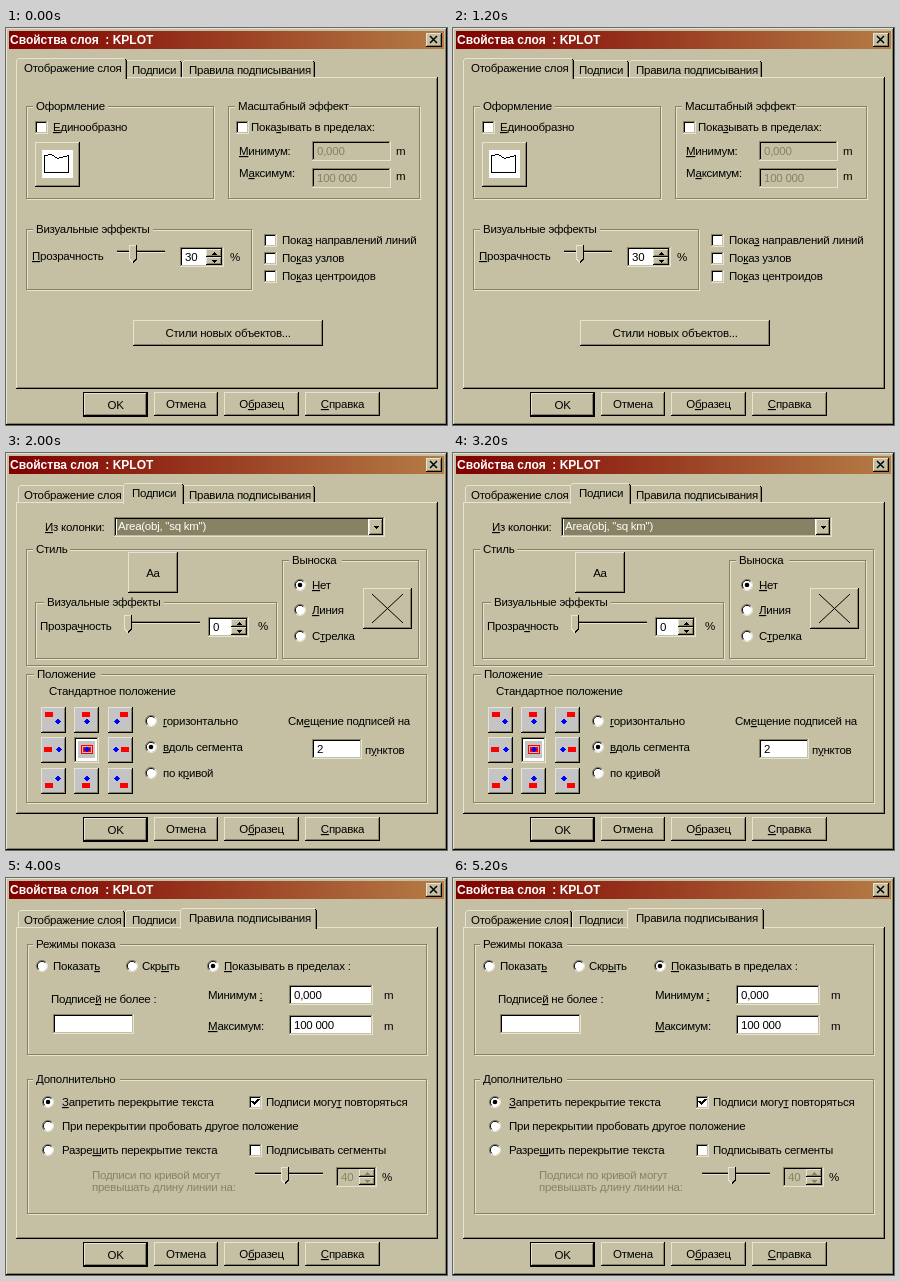
These frames come from a looping animation (441 by 397 pixels, 6000 ms). An HTML page:

```html
<!DOCTYPE html>
<html lang="ru">
<head>
<meta charset="utf-8">
<title>Свойства слоя</title>
<style>
html, body { margin: 0; width: 100%; height: 100%; overflow: hidden; background: #c5c0a4; }
svg { display: block; }
text { font: 11.5px "Liberation Sans", Arial, sans-serif; letter-spacing: -.25px; white-space: pre; }
.u { text-decoration: underline; }
.title { font-size: 12px; font-weight: bold; letter-spacing: 0; }
</style>
</head>
<body>
<svg id="stage" width="441" height="397" viewBox="0 0 441 397" shape-rendering="crispEdges"></svg>
<script>
const FACE = '#c5c0a4', LIGHT = '#e6e3d2', DARK = '#878263', INK = '#000', WHITE = '#fff';
const RED = '#f00', BLUE = '#00f', GREY = '#c4c4c4';

const rect = (x, y, w, h, c) => `<rect x="${x}" y="${y}" width="${w}" height="${h}" fill="${c}"/>`;
const path = (d, stroke = INK, fill = 'none', w = 1) =>
  `<path d="${d}" stroke="${stroke}" fill="${fill}" stroke-width="${w}"/>`;
const smooth = s => `<g shape-rendering="auto">${s}</g>`;

// y is the middle of the line; "&" underlines the next letter
function text(x, y, s, o = {}) {
  const body = s.replace(/&(.)/g, '<tspan class="u">$1</tspan>');
  return `<text x="${x}" y="${y + 4}" fill="${o.c || INK}" text-anchor="${o.mid ? 'middle' : 'start'}" class="${o.cls || ''}">${body}</text>`;
}
const dimText = (x, y, s) => text(x, y, s, { c: DARK });

// Two-tone one pixel frame
const edge = (x, y, w, h, a, b) =>
  rect(x, y, w, 1, a) + rect(x, y, 1, h, a) + rect(x, y + h - 1, w, 1, b) + rect(x + w - 1, y, 1, h, b);
const raised = (x, y, w, h, fill = FACE) =>
  rect(x, y, w, h, fill) + edge(x, y, w, h, LIGHT, INK) + edge(x + 1, y + 1, w - 2, h - 2, fill, DARK);
const sunken = (x, y, w, h, fill = WHITE) =>
  rect(x, y, w, h, fill) + edge(x, y, w, h, DARK, LIGHT) + edge(x + 1, y + 1, w - 2, h - 2, INK, FACE);

function button(x, y, w, h, s, main) {
  const frame = main ? rect(x, y, w, h, INK) + raised(x + 1, y + 1, w - 2, h - 2) : raised(x, y, w, h);
  return frame + text(x + w / 2, y + h / 2, s, { mid: true });
}

function group(x, y, x2, y2, s, lx, labelW) {
  const w = x2 - x, h = y2 - y;
  return edge(x + 1, y + 1, w, h, LIGHT, LIGHT) + edge(x, y, w, h, DARK, DARK) +
    rect(lx - 3, y - 1, labelW + 6, 4, FACE) + text(lx, y, s);
}

function check(x, y, s, tx, on) {
  return sunken(x, y - 6, 13, 13) +
    (on ? path(`M${x + 3} ${y - 1}l2.5 3l4.5 -5`, INK, 'none', 2) : '') + text(tx, y, s);
}

function radio(x, y, s, tx, on) {
  return smooth(`<circle cx="${x}" cy="${y}" r="5" fill="#fff"/>` +
    path(`M${x - 4} ${y + 4}A5.6 5.6 0 0 1 ${x + 4} ${y - 4}`, DARK) +
    path(`M${x - 3.3} ${y + 3.3}A4.6 4.6 0 0 1 ${x + 3.3} ${y - 3.3}`) +
    path(`M${x - 4} ${y + 4}A5.6 5.6 0 0 0 ${x + 4} ${y - 4}`, LIGHT) +
    (on ? `<circle cx="${x}" cy="${y}" r="2.3"/>` : '')) + text(tx, y, s);
}

function field(x, y, w, h, s, off) {
  return sunken(x, y, w, h, off ? FACE : WHITE) + (off ? dimText : text)(x + 5, y + h / 2, s);
}

function spinner(x, y, w, h, s, off) {
  const bx = x + w - 18, cx = bx + 8, half = (h - 4) / 2, my = y + 2 + half, c = off ? DARK : INK;
  return field(x, y, w, h, s, off) + raised(bx, y + 2, 16, half) + raised(bx, my, 16, half) +
    path(`M${cx - 3} ${y + 8}h6l-3 -3z`, 'none', c) + path(`M${cx - 3} ${my + 3}h6l-3 3z`, 'none', c);
}

function slider(x, x2, y, tx, ty, h) {
  return rect(x, y, x2 - x, 1, DARK) + rect(x, y + 1, x2 - x, 1, INK) + rect(x, y + 2, x2 - x, 1, LIGHT) +
    path(`M${tx} ${ty}h8v${h - 4}l-4 4l-4 -4z`, 'none', FACE) +
    path(`M${tx + 4} ${ty + h - .5}l-3.5 -3.5V${ty + .5}h7`, LIGHT) +
    path(`M${tx + 7.5} ${ty}v${h - 4}l-3.5 3.5`);
}

const TABS = [[12, 119, 'Отображение слоя', 18], [119, 176, 'Подписи', 126], [176, 309, 'Правила подписывания', 183]];

function tab(i, on) {
  const [a, b, s, tx] = TABS[i], g = on ? 2 : 0;
  const x = a - g, x2 = b + g, y = 32 - g, bottom = on ? 51 : 49;
  return rect(x + 1, y + 1, x2 - x - 2, bottom - y - 1, FACE) +
    rect(x, y + 2, 1, bottom - y - 2, LIGHT) + rect(x + 1, y + 1, 1, 1, LIGHT) +
    rect(x + 2, y, x2 - x - 4, 1, LIGHT) + rect(x2 - 2, y + 1, 1, 1, INK) +
    rect(x2 - 1, y + 2, 1, bottom - y - 2, INK) + rect(x2 - 2, y + 2, 1, bottom - y - 2, DARK) +
    text(tx, on ? 40 : 42, s);
}

function tabs(active) {
  return TABS.map((_, i) => i === active ? '' : tab(i)).join('') +
    raised(10, 49, 422, 312) + tab(active, true);
}

function shell() {
  return '<defs><linearGradient id="bar"><stop stop-color="#800000"/><stop offset="1" stop-color="#b57c45"/></linearGradient></defs>' +
    raised(0, 0, 441, 397) + rect(3, 3, 435, 18, 'url(#bar)') +
    text(4, 12, 'Свойства слоя  : KPLOT', { c: WHITE, cls: 'title' }) +
    raised(420, 5, 16, 14) + smooth(path('M424 8l7 7M431 8l-7 7', INK, 'none', 1.5)) +
    button(77, 364, 65, 25, 'OK', true) + button(148, 364, 64, 24, 'Отмена') +
    button(218, 364, 75, 24, 'О&бразец') + button(299, 364, 75, 24, '&Справка');
}

function layerPage() {
  return group(20, 78, 208, 171, 'Оформление', 30, 69) +
    check(29, 99, '&Единообразно', 47) + raised(29, 114, 45, 45) + rect(36, 122, 31, 28, WHITE) +
    path('M38.5 127.5l7 -1l6 4l11 -3v17h-24z') +
    group(222, 78, 414, 171, 'Масштабный эффект', 232, 108) +
    check(230, 99, 'Пока&зывать в пределах:', 245) +
    text(233, 123, '&Минимум:') + field(306, 113, 79, 20, '0,000', true) + text(390, 123, 'm') +
    text(233, 145, 'М&аксимум:') + field(306, 140, 79, 20, '100 000', true) + text(390, 148, 'm') +
    group(20, 201, 246, 262, 'Визуальные эффекты', 30, 114) + text(26, 228, '&Прозрачность') +
    slider(111, 159, 222, 123, 217, 18) + spinner(174, 219, 44, 20, '30') + text(224, 229, '%') +
    check(258, 212, 'Пока&з направлений линий', 276) + check(258, 230, 'По&каз узлов', 276) +
    check(258, 248, 'По&каз центроидов', 276) + button(127, 292, 190, 26, 'Стили новых объектов...');
}

// Label placement buttons: red label around a blue anchor point
function anchors() {
  let out = '';
  for (let r = -1; r <= 1; r++) for (let c = -1; c <= 1; c++) {
    const x = Math.round(68 + 33.5 * c), y = Math.round(284 + 30.5 * r), mid = !r && !c;
    const cx = x + 12, cy = y + 12, side = r ? 4 : 5;
    const bx = cx - side * c, by = cy - 2 * r;
    out += mid ? sunken(x, y, 25, 26, WHITE) + rect(x + 4, y + 4, 17, 17, GREY) +
        edge(cx - 5, cy - 4, 12, 9, RED, RED) + rect(cx - 3, cy - 2, 8, 5, RED)
      : raised(x, y, 25, 26, GREY) + rect(cx - 4 + side * c, cy - 2 + 5 * r, 8, 5, RED);
    out += path(`M${bx + .5} ${by - 2.5}l3 3l-3 3l-3 -3z`, 'none', BLUE);
  }
  return out;
}

function labelPage() {
  return text(39, 74, '&Из колонки:') + sunken(108, 64, 271, 20) + rect(111, 66, 251, 16, DARK) +
    text(112, 73, 'Area(obj, "sq km")', { c: WHITE }) + raised(363, 66, 14, 16) +
    path('M367 73h6l-3 3z', 'none', INK) +
    group(20, 96, 421, 213, 'Стиль', 30, 31) + button(122, 99, 50, 41, 'Aa') +
    group(29, 149, 271, 206, 'Визуальные эффекты', 41, 114) + text(34, 173, 'Прозра&чность') +
    slider(118, 194, 168, 118, 162, 18) + spinner(202, 164, 41, 20, '0') + text(252, 173, '%') +
    group(276, 107, 413, 206, 'Выноска', 286, 47) +
    radio(294, 132, '&Нет', 306, true) + radio(294, 157, '&Линия', 306) + radio(294, 183, 'С&трелка', 306) +
    raised(357, 135, 49, 41) + smooth(path('M366 141l31 29M397 141l-31 29')) +
    group(20, 221, 421, 350, 'Положение', 31, 61) + text(43, 238, 'Стандартное положение') + anchors() +
    radio(145, 268, '&горизонтально', 157) + radio(145, 294, '&вдоль сегмента', 157, true) +
    radio(145, 320, 'по к&ривой', 157) + text(282, 268, 'См&ещение подписей на') +
    field(306, 286, 50, 20, '2') + text(359, 297, 'п&унктов');
}

function rulesPage() {
  return group(21, 66, 421, 177, 'Режимы показа', 30, 81) +
    radio(36, 88, 'Показат&ь', 47) + radio(126, 88, 'Скр&ыть', 136) +
    radio(207, 88, '&Показывать в пределах :', 218, true) +
    text(45, 121, 'Подписе&й не более :') + field(47, 136, 81, 20, '') +
    text(202, 117, 'Минимум &:') + field(283, 107, 84, 20, '0,000') + text(378, 117, 'm') +
    text(202, 148, '&Максимум:') + field(283, 137, 84, 20, '100 000') + text(378, 148, 'm') +
    group(21, 201, 421, 336, 'Дополнительно', 30, 81) +
    radio(42, 224, '&Запретить перекрытие текста', 56, true) +
    radio(42, 248, 'При перекрытии пробовать &другое положение', 56) +
    radio(42, 272, 'Разре&шить перекрытие текста', 56) +
    check(243, 224, 'Подписи могу&т повторяться', 260, true) + check(243, 272, 'По&дписывать сегменты', 260) +
    dimText(86, 297, 'Подписи по кривой могут') + dimText(86, 309, 'превышать длину линии на:') +
    slider(249, 317, 294, 275, 289, 17) + spinner(330, 289, 41, 20, '40', true) + text(376, 299, '%');
}

const HOLD = 2000;
const pages = [layerPage, labelPage, rulesPage];
document.getElementById('stage').innerHTML =
  shell() + pages.map((page, i) => `<g class="page">${tabs(i)}${page()}</g>`).join('');
const layers = document.querySelectorAll('.page');

function draw(ms) {
  const now = Math.floor(ms / HOLD) % pages.length;
  layers.forEach((g, i) => { g.style.display = i === now ? '' : 'none'; });
}

function tick() {
  draw(performance.now());
  requestAnimationFrame(tick);
}
tick();
</script>
</body>
</html>
```
